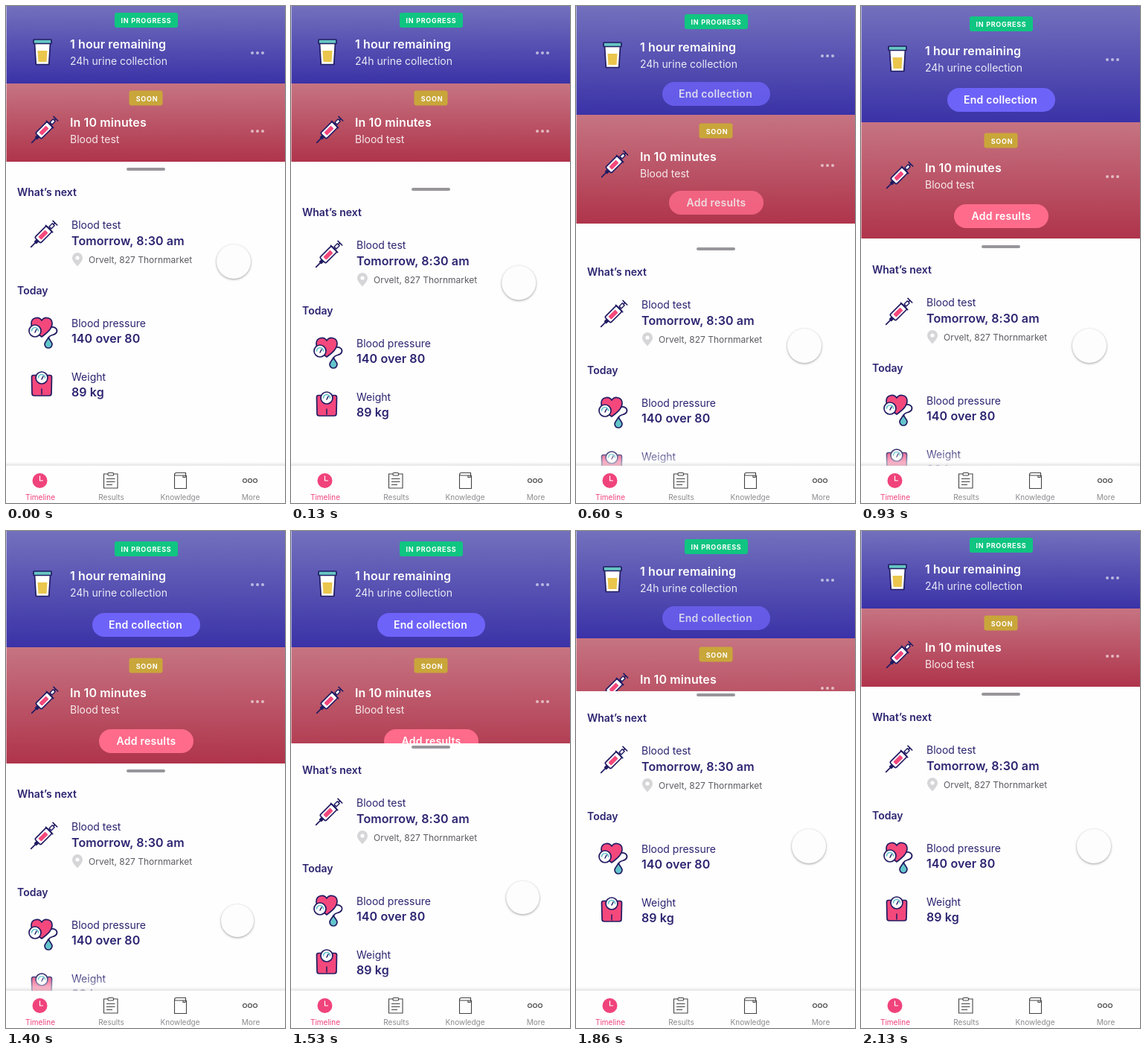
Recreate the animation shown at these times as an HTML page. Size 375x667 px, loop 2.16 s.

```html
<!DOCTYPE html>
<html lang="en">
<head>
<meta charset="utf-8">
<title>Health timeline</title>
<style>
  html, body { margin: 0; width: 100%; height: 100%; overflow: hidden; background: #fefefe; }
  #stage { display: block; width: 375px; height: 667px; }
  text { font-family: Inter, Roboto, "Liberation Sans", sans-serif; font-size: 14px; fill: #2b2470; }
  .big { font-size: 16px; font-weight: 600; letter-spacing: .1px; }
  .head { font-weight: 600; }
  .place { font-size: 12px; fill: #5b5b62; }
  .card text { fill: #fff; }
  .card .sub { fill: rgba(255, 255, 255, .88); }
  .card .tag text { font-size: 9px; font-weight: 700; letter-spacing: .7px; text-anchor: middle; }
  .card .button text { font-weight: 600; letter-spacing: .25px; text-anchor: middle; }
  .dots { fill: rgba(255, 255, 255, .6); }
  .ink { stroke: #211c62; stroke-width: 1.7; stroke-linejoin: round; stroke-linecap: round; }
  .tabs text { font-size: 10px; text-anchor: middle; fill: #8b8b8f; }
  .tabs .on { fill: #f0437b; }
  .line { fill: none; stroke: #444; stroke-width: 1.1; }
  #touch { filter: drop-shadow(0 1px 1.8px rgba(0, 0, 0, .38)); }
</style>
</head>
<body>
<svg id="stage" viewBox="0 0 375 667">
  <defs>
    <linearGradient id="blue" x2="0" y2="1">
      <stop stop-color="#7370bd"/><stop offset="1" stop-color="#3a32a7"/>
    </linearGradient>
    <linearGradient id="red" x2="0" y2="1">
      <stop stop-color="#c67482"/><stop offset="1" stop-color="#af344b"/>
    </linearGradient>
    <linearGradient id="shade" x2="0" y2="1">
      <stop stop-color="#000" stop-opacity="0"/><stop offset="1" stop-color="#000" stop-opacity=".1"/>
    </linearGradient>
    <linearGradient id="fade" x2="0" y2="1">
      <stop stop-color="#fefefe" stop-opacity="0"/><stop offset="1" stop-color="#fefefe" stop-opacity=".7"/>
    </linearGradient>
    <g id="dots">
      <circle cx="331" cy="63" r="2"/><circle cx="338" cy="63" r="2"/><circle cx="345" cy="63" r="2"/>
    </g>
    <g id="syringe" class="ink" transform="rotate(-45)">
      <path d="M-24.500 0H-16M11 0H21M21-4V4" fill="none"/>
      <path d="M-16-1.500h4v3h-4z" fill="#211c62"/>
      <rect x="-12" y="-5.500" width="22" height="11" rx="2" fill="#fff"/>
      <rect x="-8" y="-2.800" width="13" height="5.600" rx="1" fill="#f4487c" stroke="none"/>
      <path d="M10-6.500V6.500" fill="none"/>
      <path d="M12-2h6v4h-6z" fill="#fff" stroke-width="1.400"/>
    </g>
    <g id="gauge" class="ink">
      <circle r="8" fill="#fff"/>
      <path d="M-4.500 0a4.500 4.500 0 0 1 9 0" fill="none" stroke="#64c5cb"/>
      <path d="M0 2L2-2" stroke-width="1.500"/>
    </g>
  </defs>

  <rect width="375" height="667" fill="#fefefe"/>

  <svg class="card" width="375" height="104">
    <rect x=".5" width="100%" height="100%" fill="url(#blue)"/>
    <g class="tag">
      <rect x="146" y="9" width="85" height="20" rx="3" fill="#10c581"/>
      <text x="188.500" y="22.500">IN PROGRESS</text>
    </g>
    <g class="info">
      <g class="ink">
        <path d="M38.500 50h21l-1.800 28.500h-17.400z" fill="#fff"/>
        <path d="M42.500 60h13l-1 15h-11z" fill="#eac64c" stroke="none"/>
        <rect x="37" y="45" width="24" height="5.500" rx="1" fill="#66c6c4"/>
      </g>
      <text class="big" x="86" y="57">1 hour remaining</text>
      <text class="sub" x="86" y="79">24h urine collection</text>
      <use href="#dots" class="dots"/>
    </g>
    <g class="button">
      <rect x="116" width="145" height="32" rx="16" fill="#6e63f8"/>
      <text x="187.500" y="21">End collection</text>
    </g>
  </svg>

  <svg class="card" width="375" height="105" y="104">
    <rect x=".5" width="100%" height="100%" fill="url(#red)"/>
    <g class="tag">
      <rect x="165.500" y="9.500" width="45" height="20" rx="3" fill="#c9a63a"/>
      <text x="189.500" y="23.500">SOON</text>
    </g>
    <g class="info">
      <use href="#syringe" transform="translate(52 62)"/>
      <text class="big" x="86" y="58">In 10 minutes</text>
      <text class="sub" x="86" y="80">Blood test</text>
      <use href="#dots" class="dots" y="1"/>
    </g>
    <g class="button">
      <rect x="125" width="127" height="32" rx="16" fill="#ff6b8b"/>
      <text x="188.500" y="20.500">Add results</text>
    </g>
  </svg>

  <g id="sheet">
    <rect y="214" width="375" height="500" fill="#fefefe"/>
    <rect x="162" y="217" width="52" height="4" rx="2" fill="#98969b"/>
    <text class="head" x="15" y="255">What’s next</text>
    <use href="#syringe" transform="translate(51 306)"/>
    <text x="88" y="299">Blood test</text>
    <text class="big" x="88" y="320.500">Tomorrow, 8:30 am</text>
    <path d="M96 349.500c-4-5-7-7.500-7-11.500a7 7 0 0 1 14 0c0 4-3 6.500-7 11.500z" fill="#d6d6d9"/>
    <circle cx="96" cy="338" r="2.600" fill="#fefefe"/>
    <text class="place" x="111" y="344.500">Orvelt, 827 Thornmarket</text>

    <text class="head" x="15" y="387">Today</text>
    <g class="ink">
      <path d="M61 431c5-1 9 3 7 7s-8 3-10 6l-1 3" fill="none"/>
      <path d="M48 444C40 438 34 433 34 426C34 418 44 416 48 422C52 416 62 418 62 426C62 433 56 438 48 444z" fill="#f4487c"/>
      <path d="M57 445c2 4 5 6 5 9a5 5 0 0 1-10 0c0-3 3-5 5-9z" fill="#64c5cb"/>
    </g>
    <use href="#gauge" transform="translate(39 436)"/>
    <text x="88" y="431">Blood pressure</text>
    <text class="big" x="88" y="452">140 over 80</text>

    <g class="ink">
      <path d="M37 495.500h22q2.500 0 2.500 2.500l-.5 22q0 3-3 3H38q-3 0-3-3l-.5-22q0-2.500 2.500-2.500z" fill="#f4487c"/>
      <path d="M48 514v7" fill="none" stroke-width="1.500"/>
    </g>
    <use href="#gauge" transform="translate(48 499)"/>
    <text x="88" y="503">Weight</text>
    <text class="big" x="88" y="524">89 kg</text>
  </g>

  <rect y="593" width="375" height="24" fill="url(#fade)"/>
  <circle id="touch" r="23" fill="#fdfdfe"/>

  <g class="tabs">
    <rect y="612" width="375" height="5" fill="url(#shade)"/>
    <rect y="617" width="375" height="50" fill="#fefefe"/>
    <circle class="on" cx="45.500" cy="637" r="10"/>
    <path d="M45.500 630.500v6.500h4.500" fill="none" stroke="#fff" stroke-width="1.200"/>
    <g class="line">
      <path d="M137 628h-5.500v19h18.500v-19h-5.500M135 634.500h11.500M135 638.500h11.500M135 642.500h8"/>
      <rect x="137" y="626.500" width="7.500" height="3.500" rx="1"/>
      <path d="M242.500 630v17.500h-16v-18.500q0-2.500 2.500-2.500h12.500v3.500M242.500 630h-14.500q-1.500 0-1.500-1.500M238 630v2.500h3v-2.500"/>
      <circle cx="321" cy="637" r="2.500"/><circle cx="328" cy="637" r="2.500"/><circle cx="335" cy="637" r="2.500"/>
    </g>
    <text class="on" x="46" y="663">Timeline</text>
    <text x="141.500" y="663">Results</text>
    <text x="234" y="663">Knowledge</text>
    <text x="329" y="663">More</text>
  </g>
</svg>

<script>
  const LOOP = 2160;
  // The picture holds still between these moments.
  const ticks = [0, 60, 130, 200, 260, 330, 460, 600, 730, 930, 1000, 1060, 1130, 1200,
    1260, 1330, 1400, 1460, 1530, 1600, 1660, 1730, 1860, 2000, 2130];

  const ease = x => x < .5 ? 2 * x * x : 1 - 2 * (1 - x) ** 2;

  // Eased path through [time, value] points.
  const track = (...points) => t => {
    const i = points.findIndex(p => p[0] > t);
    if (i < 0) return points[points.length - 1][1];
    if (i === 0) return points[0][1];
    const [t0, a] = points[i - 1], [t1, b] = points[i];
    return a + (b - a) * ease((t - t0) / (t1 - t0));
  };

  const sheetY = track([20, 0], [330, 108], [460, 108], [600, 107], [930, 104], [1400, 103], [1730, 1], [2000, 0]);
  const openness = track([330, 0], [720, 1], [1730, 1], [2120, 0]);
  const touchX = track([20, 306], [330, 307], [930, 307], [1400, 311], [1730, 313]);
  const touchY = track([20, 343], [330, 456], [930, 456], [1400, 523], [1730, 423]);
  const touchR = track([930, 23], [1400, 22], [1730, 23]);

  const cards = [...document.querySelectorAll('.card')].map(el => ({
    el,
    tag: el.querySelector('.tag'),
    info: el.querySelector('.info'),
    button: el.querySelector('.button')
  }));
  const sheet = document.getElementById('sheet');
  const touch = document.getElementById('touch');

  const shift = (el, y) => el.setAttribute('transform', `translate(0 ${Math.round(y)})`);

  function draw(t) {
    const p = openness(t);
    const firstHeight = Math.round(104 + 52 * p);
    cards.forEach((card, i) => {
      card.el.setAttribute('y', i * firstHeight);
      card.el.setAttribute('height', i ? Math.round(104.6 + 51.6 * p) : firstHeight);
      shift(card.tag, 5 * p ** 4);
      shift(card.info, 9 * p ** 4);
      shift(card.button, 68 + 42 * p);
      card.button.setAttribute('opacity', p);
    });
    shift(sheet, sheetY(t));
    touch.setAttribute('cx', touchX(t));
    touch.setAttribute('cy', touchY(t));
    touch.setAttribute('r', touchR(t));
  }

  const start = performance.now();
  function loop() {
    const t = (performance.now() - start) % LOOP;
    draw(ticks.findLast(k => k <= t));
    requestAnimationFrame(loop);
  }
  loop();
</script>
</body>
</html>
```
